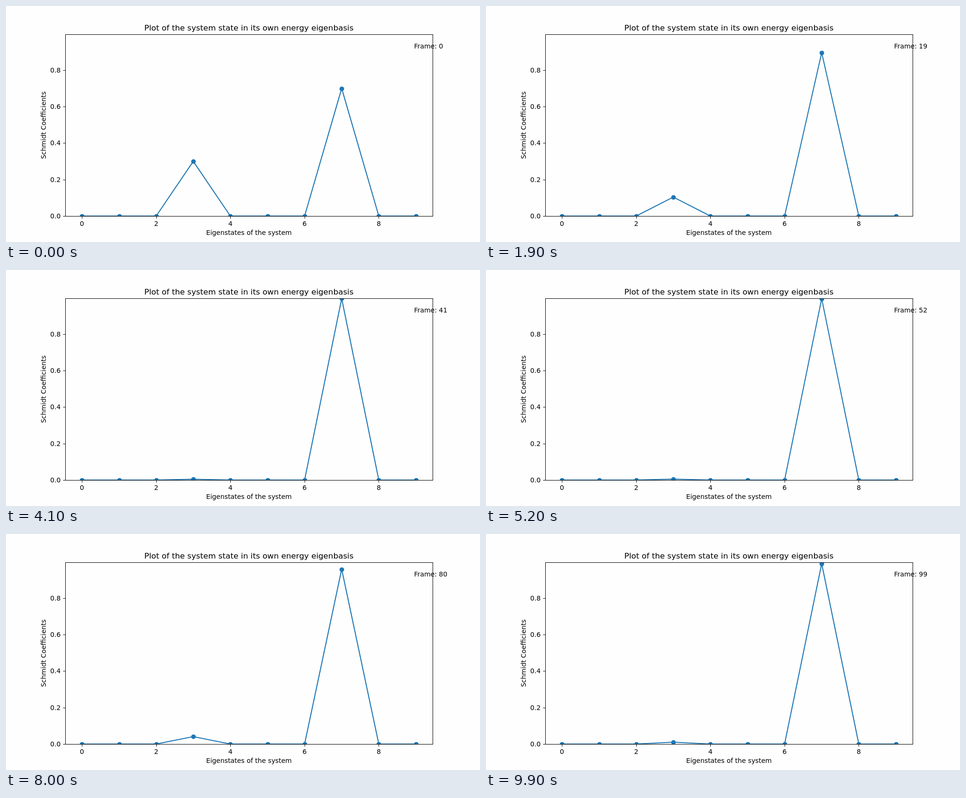
An HTML page with a canvas that plays this animation: 1000 px wide and 500 px high, repeating every 10000 ms.

```html
<!DOCTYPE html>
<html lang="en">
<head>
<meta charset="utf-8">
<title>Energy eigenbasis plot</title>
<style>
  html, body { margin: 0; width: 100%; height: 100%; overflow: hidden; background: #fefefe; }
  canvas { display: block; }
</style>
</head>
<body>
<canvas id="plot" width="1000" height="500"></canvas>
<script>
const ctx = document.getElementById('plot').getContext('2d');
const LOOP = 10000, STEP = 100;
const LEFT = 125, RIGHT = 900, TOP = 60, BASE = 445, UNIT = 386.3;
const BLUE = '#1f77b4', BLACK = '#000';
const POINT = 100 / 72;

// [step, weight of state 3]; state 7 holds the rest
const KEYS = [
  [0, 0.3], [5, 0.278], [10, 0.222], [15, 0.154], [19, 0.104],
  [25, 0.05], [31, 0.02], [37, 0.0075], [43, 0.0042], [52, 0.005],
  [60, 0.013], [66, 0.0265], [72, 0.0385], [77, 0.042], [80, 0.041],
  [88, 0.031], [94, 0.0185], [99, 0.0105]
];

const px = state => 160.23 + state * 78.283;
const py = value => BASE - value * UNIT;

function slope(i) {
  if (i === 0) return 0;
  const a = KEYS[i - 1], b = KEYS[Math.min(i + 1, KEYS.length - 1)];
  return (b[1] - a[1]) / (b[0] - a[0]);
}

// Cubic Hermite curve through the key points
function weight(n) {
  let i = 0;
  while (i < KEYS.length - 2 && n > KEYS[i + 1][0]) i++;
  const [x0, y0] = KEYS[i], [x1, y1] = KEYS[i + 1];
  const h = x1 - x0, u = (n - x0) / h, v = 1 - u;
  return v * v * ((1 + 2 * u) * y0 + u * h * slope(i)) +
         u * u * ((1 + 2 * v) * y1 - v * h * slope(i + 1));
}

function label(text, x, y, align = 'center', points = 10) {
  ctx.font = `${points * POINT}px "DejaVu Sans", sans-serif`;
  ctx.textAlign = align;
  ctx.fillStyle = BLACK;
  ctx.fillText(text, x, y);
}

function drawCurve(values) {
  ctx.save();
  ctx.beginPath();
  ctx.rect(LEFT, TOP, RIGHT - LEFT, BASE - TOP + 1);
  ctx.clip();
  ctx.strokeStyle = ctx.fillStyle = BLUE;
  ctx.lineWidth = 1.5 * POINT;
  ctx.lineJoin = 'round';
  ctx.beginPath();
  values.forEach((v, i) => ctx.lineTo(px(i), py(v)));
  ctx.stroke();
  values.forEach((v, i) => {
    ctx.beginPath();
    ctx.arc(Math.round(px(i)) + 0.5, Math.round(py(v)) + 0.5, 3.5 * POINT, 0, 2 * Math.PI);
    ctx.fill();
  });
  ctx.restore();
}

function drawAxes() {
  ctx.strokeStyle = BLACK;
  ctx.lineWidth = 1;
  ctx.strokeRect(LEFT + 0.5, TOP + 0.5, RIGHT - LEFT, BASE - TOP);
  ctx.beginPath();
  for (let i = 0; i < 5; i++) {
    const x = Math.round(px(2 * i)) + 0.5;
    const y = Math.round(py(0.2 * i)) + 0.5;
    ctx.moveTo(x, BASE + 0.5);
    ctx.lineTo(x, BASE + 5.5);
    ctx.moveTo(LEFT + 0.5, y);
    ctx.lineTo(LEFT - 4.5, y);
    label(2 * i, px(2 * i), 466);
    label((0.2 * i).toFixed(1), 115.3, y + 4.5, 'right');
  }
  ctx.stroke();

  label('Plot of the system state in its own energy eigenbasis', 512.5, 52, 'center', 12);
  label('Eigenstates of the system', 512.5, 485);
  ctx.save();
  ctx.translate(84, 252.5);
  ctx.rotate(-Math.PI / 2);
  label('Schmidt Coefficients', 0, 0);
  ctx.restore();
}

function draw(time) {
  const n = Math.floor((time % LOOP) / STEP);
  const values = Array(10).fill(0);
  values[3] = weight(n);
  values[7] = 1 - values[3];

  ctx.fillStyle = '#fefefe';
  ctx.fillRect(0, 0, 1000, 500);
  drawCurve(values);
  drawAxes();
  label(`Frame: ${n}`, 861, 90, 'left');
}

const start = performance.now();
function tick() {
  draw(performance.now() - start);
  requestAnimationFrame(tick);
}
tick();
</script>
</body>
</html>
```
